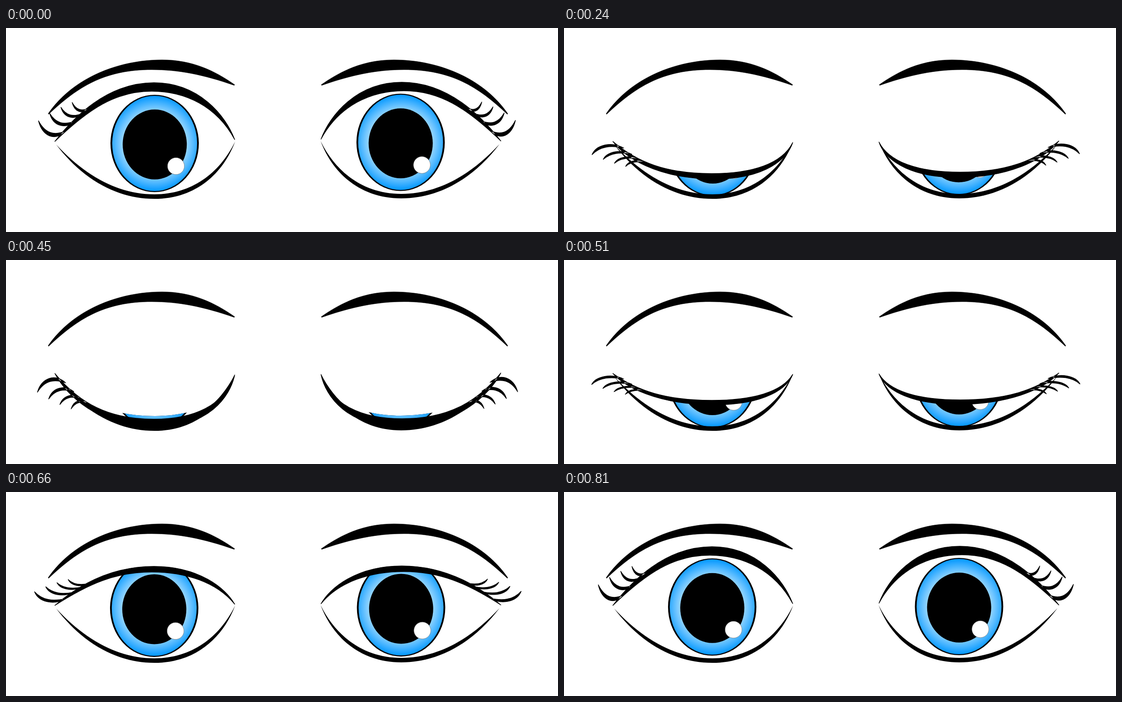
These frames come from a looping animation (1231 px wide and 455 px high, 4.35 s). An HTML page:

```html
<!DOCTYPE html>
<html lang="en">
<head>
<meta charset="utf-8">
<title>Blinking eyes</title>
<style>
  html, body { margin: 0; width: 100%; height: 100%; overflow: hidden; background: #fff; }
  svg { display: block; width: 100%; height: 100%; }
  .lid { stroke: #000; stroke-width: 1.4; stroke-linejoin: round; }
</style>
</head>
<body>
<svg viewBox="0 0 1231 455">
  <defs>
    <radialGradient id="blue" gradientUnits="userSpaceOnUse" cx="0" cy="0" r="107">
      <stop offset=".64" stop-color="#a0daff"/>
      <stop offset="1" stop-color="#0096ff"/>
    </radialGradient>
    <clipPath id="clipL"><path id="maskL"/></clipPath>
    <clipPath id="clipR"><path id="maskR" transform="translate(1212.5 -1) scale(-1 1)"/></clipPath>
    <g id="iris">
      <ellipse rx="98.5" ry="108.5"/>
      <ellipse rx="94.6" ry="106.2" fill="url(#blue)"/>
      <ellipse cx=".2" cy="2.2" rx="71.5" ry="78"/>
      <circle cx="47.5" cy="50.5" r="18.8" fill="#fff" stroke="#777" stroke-width=".8"/>
    </g>
    <path id="brow" stroke="#000" stroke-width=".6" stroke-linejoin="round"
      d="M94 191C150 110 252 71 348 71C415 71 465 95 510 126.5L509 128C440 104 385 93 325 93C220 93 160 131 95 192.5Z"/>
    <path id="lower" d="M112 260C165 330 240 381 331 381C427 381 486 320 511 253C477 323 415 371 331 371C250 371 177 330 112 260Z"/>
  </defs>
  <g clip-path="url(#clipL)"><use id="irisL" href="#iris"/></g>
  <g clip-path="url(#clipR)"><use id="irisR" href="#iris"/></g>
  <use href="#brow"/>
  <use href="#brow" transform="translate(1213 0) scale(-1 1)"/>
  <use href="#lower"/>
  <path id="lidL" class="lid"/>
  <g transform="translate(1212.5 -1) scale(-1 1)">
    <use href="#lower"/>
    <path id="lidR" class="lid"/>
  </g>
</svg>
<script>
const LOOP = 4350, STEP = 30, AXIS = 253, REOPEN = 390, DONE = 810;
const $ = id => document.getElementById(id);
const clamp = v => Math.min(1, Math.max(0, v));

// Edges of the fully open upper lid, left to right, and the line between them
const OUTER = [[109,253], [150,200], [225,122], [330,122], [430,122], [490,195], [510,249]];
const INNER = [[109,253], [185,180], [245,141], [325,141], [400,141], [470,175], [510,249]];
const MIDDLE = OUTER.map(([x, y], i) => [(x + INNER[i][0]) / 2, (y + INNER[i][1]) / 2]);

// One lash from tip to base and back, in units of its width and height
const LASH = [[0,0], [.13,1.5], [.62,2.05], [1,1], [.59,1.43], [.26,1.26], [0,0]];

// Cubic path with heights scaled about the corner axis
function curve(pts, s) {
  const p = pts.map(([x, y]) => `${x.toFixed(2)} ${(AXIS + s * (y - AXIS)).toFixed(2)}`);
  return 'M' + p[0] + 'C' + p.slice(1).join(' ');
}

// A lowered lid gets a fuller, rounder arc
function fuller(pts, s) {
  const k = .28 * clamp((.6 - s) / .6);
  return pts.map(([x, y]) => {
    const d = x - 310, u = d / 200;
    return [x + d * k * Math.max(0, 1 - u * u), y];
  });
}

function lash(i, s, swing) {
  const x = 60.5 + 25 * i + swing * s ** 4, y = 207 - 18 * i + 1.45 * i * i;
  const w = 133 + 19 * i - .7 * i * i - x, h = 230 - 24 * i + 2.4 * i * i - y;
  return curve(LASH.map(([u, v]) => [x + u * w, y + v * h]), s) + 'Z';
}

// Lid openness: 1 open, 0 flat, negative drooping
function openness(t, length, power) {
  const p = t < REOPEN
    ? Math.sin(Math.PI / 2 * clamp(t / length) ** power)
    : (1 - clamp((t - REOPEN) / (DONE - REOPEN)) ** 2) ** 3.4;
  return 1 - 2.05 * p;
}

function eye(side, s, lead, swing, x, y) {
  const dip = 9.5 * (1 - ((1 + s) / 2) ** 2);
  const outer = curve(fuller(OUTER, s), s);
  const inner = curve(fuller(INNER, s).reverse(), s).replace('M', 'L');
  const lashes = [0, 1, 2, 3].map(i => lash(i, s, swing)).join('');
  $('lid' + side).setAttribute('d', outer + inner + 'Z' + lashes);
  $('mask' + side).setAttribute('d', curve(fuller(MIDDLE, s), s + lead) + 'V500H109Z');
  $('iris' + side).setAttribute('transform', `translate(${x} ${y + dip})`);
}

function draw(now) {
  const t = Math.floor((now % LOOP) / STEP) * STEP;
  const lead = .13 * clamp(1 - Math.abs(t - 450) / 60);
  const drift = clamp((t - 300) / 300);
  eye('L', openness(t, 360, 1.3), lead, 12 + 4 * drift, 331.5 - drift, 257.5 - drift);
  eye('R', openness(t, 315, 2), lead, 16, 880 + drift, 255 + drift / 2);
}

let start;
function tick(now) {
  start ??= now;
  draw(now - start);
  requestAnimationFrame(tick);
}
draw(0);
requestAnimationFrame(tick);
</script>
</body>
</html>
```
